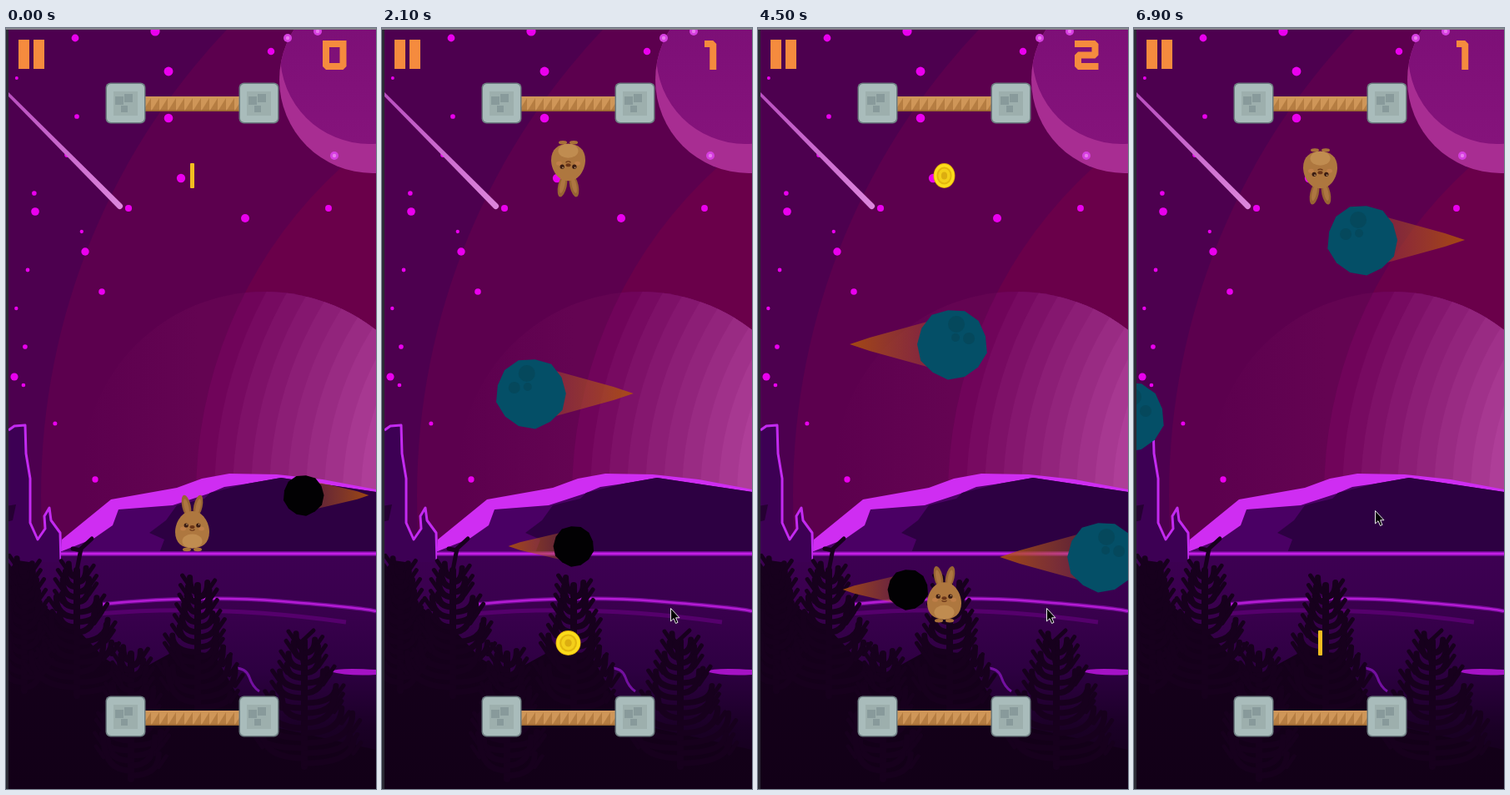
These frames come from a looping animation (444x912 px, 7 s). An HTML page with a canvas:

```html
<!DOCTYPE html>
<html lang="en">
<head>
<meta charset="utf-8">
<title>Bouncing bunny</title>
<style>
html, body { margin: 0; width: 100%; height: 100%; overflow: hidden; background: #000; }
canvas { display: block; }
</style>
</head>
<body>
<canvas id="stage" width="444" height="912" role="img" aria-label="Bunny game: GAME OVER, RESTART"></canvas>
<script>
const W = 444, H = 912, LOOP = 7000, STEP = 100;
const GAME_OVER = 4600, RESTART = 5560;
const stage = document.getElementById('stage').getContext('2d');
let g = stage;

// drawing helpers
function fill(d, color) {
  g.fillStyle = color;
  g.fill(new Path2D(d));
}
function line(d, color, width) {
  g.strokeStyle = color;
  g.lineWidth = width;
  g.stroke(new Path2D(d));
}
function ellipse(x, y, rx, ry, color, turn = 0) {
  g.fillStyle = color;
  g.beginPath();
  g.ellipse(x, y, rx, ry, turn, 0, Math.PI * 2);
  g.fill();
}
const disc = (x, y, r, color) => ellipse(x, y, r, r, color);
function rect(x, y, w, h, color) {
  g.fillStyle = color;
  g.fillRect(x, y, w, h);
}
function panel(x, y, w, h, r, color) {
  g.fillStyle = color;
  g.beginPath();
  g.roundRect(x, y, w, h, r);
  g.fill();
}
function fade(x0, y0, x1, y1, ...colors) {
  const f = g.createLinearGradient(x0, y0, x1, y1);
  colors.forEach((c, i) => f.addColorStop(i / (colors.length - 1), c));
  return f;
}
function clipped(path, paint) {
  g.save();
  g.clip(new Path2D(path));
  paint();
  g.restore();
}
const circlePath = (x, y, r) => `M${x - r} ${y} a${r} ${r} 0 1 0 ${2 * r} 0 a${r} ${r} 0 1 0 ${-2 * r} 0Z`;
const mix = (a, b, u) => a + (b - a) * u;
function seeded(seed) {
  seed *= 7919;
  return () => (seed = (seed * 16807) % 2147483647) / 2147483647;
}

// scenery
const BRIGHT_STARS = [
  [179, 4], [195, 52], [195, 108], [210, 180], [287, 228], [35, 220], [95, 268],
  [10, 418], [83, 12], [318, 28], [147, 216], [387, 216], [115, 316], [107, 541]
];
const SHADE = '#17001d';

function stars() {
  BRIGHT_STARS.forEach(([x, y], i) => disc(x, y, 5.6 - i * .15, '#ea00ee'));
  const rnd = seeded(17);
  for (let i = 0; i < 10; i++) disc(8 + 90 * rnd(), 60 + i * 46, 2 + rnd(), '#ea00ee');
}

function sky() {
  rect(0, 0, W, H, '#4d004f');
  disc(852, 560, 810, '#5c004e');
  disc(758, 560, 530, '#6a004a');
  clipped(circlePath(310, 534, 218), () => {
    rect(90, 300, W, 300, fade(92, 0, 230, 0, '#5c004e', '#640452'));
    const bands = 10;
    for (let i = 0; i < bands; i++) {
      const u = i / (bands - 1);
      disc(758, 560, 530 - 22 * i, `rgb(${mix(112, 174, u)},${mix(4, 62, u)},${mix(90, 152, u)})`);
    }
  });
  stars();

  clipped(circlePath(440, 62, 112), () => {
    rect(320, 0, 130, 180, '#a82d92');
    disc(436, 32, 107, fade(0, 0, 0, 139, '#7d0f77', '#85137b'));
  });
  for (const [x, y] of [[338, 12], [374, 4], [394, 153]]) {
    disc(x, y, 5, '#d63fe0');
    disc(x, y, 2.2, '#e87cec');
  }
  fill('M3 77 L139 211 A3 3 0 0 1 134 216 L3 82Z', fade(3, 79, 137, 213, '#b94fc0', '#dc86dc'));
}

function hills() {
  fill('M67 613 L126 565 205 551 235 540 268 534 325 535 380 541 444 553 V640 H67Z', '#cf2df2');
  fill('M67 627 L105 612 128 596 135 577 200 572 243 558 262 550 290 546 330 539 444 556 V640 H67Z', '#4a0064');
  fill('M444 556 L330 539 290 546 245 557 238 564 205 572 192 590 172 605 190 613 184 629 H444Z', '#2d0042');
  const cliff = 'M3 482 L10 477 23 476 24 510 29 540 29 593 38 613 47 600 46 585 52 575 54 590 65 605 66 640 72 660';
  fill(cliff + 'V720 H0 V482Z', '#3d0054');
  g.lineJoin = 'round';
  line(cliff, '#c32af0', 3);
}

function lake() {
  const wave = 'M110 691 Q230 679 330 687 T444 699';
  fill(`M0 640 L66 640 V629 H${W} V${H} H0Z`, fade(0, 629, 0, H, '#3d0052', '#39004d', '#2d0041', '#1a0025', '#120017'));
  rect(66, 627, W, 6, '#6c0a8e');
  rect(66, 628.5, W, 3, '#c41fe6');
  line('M110 702 Q250 690 408 712', '#55006c', 5);
  line(wave, '#6f0a90', 5);
  line(wave, '#b41bd4', 2.5);
  line('M272 767 Q288 766 292 778 T304 795', '#7310a0', 3);
  fill('M388 771 Q400 766 444 769 V775 Q410 777 388 771Z', '#a512c6');
}

// shoots leave the stem sideways and bend upward
function bush(x, top, spread) {
  const rnd = seeded(x), tall = 150;
  line(`M${x} ${top + tall} L${x} ${top}`, SHADE, 8);
  for (let d = 8; d < tall; d += 6) {
    const u = d / tall, side = d % 4 ? 1 : -1;
    const reach = side * (8 + spread * u * mix(.5, 1, rnd()));
    const rise = mix(16, 44, rnd() * u);
    const y = top + d, tipX = x + reach, tipY = y - rise;
    line(`M${x} ${y} Q${tipX} ${y} ${tipX} ${tipY}`, SHADE, 7);
    line(`M${tipX} ${tipY + rise * .6} l${side * 9} -13`, SHADE, 5);
  }
}

function foreground() {
  g.lineCap = 'round';
  fill('M0 652 L14 638 28 640 42 690 90 725 118 755 150 775 205 745 250 750 275 795 310 835 444 865 V912 H0Z',
    fade(0, 640, 0, H, SHADE, '#120017'));
  for (const [x, top, spread] of [[22, 644, 26], [85, 650, 52], [150, 750, 40], [230, 668, 42], [358, 735, 62]]) bush(x, top, spread);
  line('M84 655 L90 624 103 612 M80 624 L90 626 M356 760 L353 737 369 722 M348 731 L354 737', SHADE, 5);
  fill('M0 573 L12 571 8 590 0 592Z', '#260033');
  g.lineCap = 'butt';
}

function block(x, y) {
  panel(x - .5, y - .5, 48, 49, 6, '#6c7c80');
  panel(x + 1, y + 1, 45, 46, 5, '#a9bcbb');
  rect(x + 9, y + 10, 29, 29, '#9dafad');
  for (const [dx, dy, s] of [[11, 16, 10], [22, 13, 10], [18, 27, 8]]) rect(x + dx, y + dy, s, s, '#889a9b');
}

function trampoline(y, ropeY) {
  clipped(`M167 ${ropeY} h114 v18 h-114Z`, () => {
    rect(167, ropeY, 114, 18, '#cf9658');
    for (let x = 164; x < 284; x += 10) fill(`M${x} ${ropeY + 18} l10 -16 v16Z`, '#b57d42');
    rect(167, ropeY + 16.5, 114, 1.5, '#98652f');
  });
  block(120, y);
  block(280, y);
}

function scenery() {
  const sheet = document.createElement('canvas');
  sheet.width = W;
  sheet.height = H;
  g = sheet.getContext('2d');
  sky();
  hills();
  lake();
  foreground();
  trampoline(66, 82);
  trampoline(801, 818);
  for (const x of [15, 33]) rect(x, 14, 13, 35, '#f58b3e');
  g = stage;
  return sheet;
}

// block lettering: strokes on a grid 2 wide and 4 high
const GLYPHS = {
  G: '20 00 04 24 22 12', A: '04 00 20 24/02 22', M: '04 00 20 24/10 14',
  E: '20 00 04 24/02 22', O: '00 20 24 04 00 20', V: '00 04 24 20',
  R: '04 00 20 22 02/12 24', S: '20 00 02 22 24 04', T: '00 20/10 14',
  0: '00 20 24 04 00 20', 1: '00 20 24', 2: '00 20 22 02 04 24'
};
function glyph(ch, x, y, w, h, s) {
  const point = p => `${x + s / 2 + p[0] / 2 * (w - s)} ${y + s / 2 + p[1] / 4 * (h - s)}`;
  const d = GLYPHS[ch].split('/').map(part => 'M' + part.split(' ').map(point).join('L')).join('');
  g.stroke(new Path2D(d));
}
function lettering(text, x, y, w, h, s, gap, color) {
  g.strokeStyle = color;
  g.lineWidth = s;
  g.lineCap = 'square';
  g.lineJoin = 'bevel';
  for (const ch of text) {
    const cw = ch === 'M' ? w * 1.26 : ch === '1' ? w / 2 : w;
    glyph(ch, x, y, cw, h, s);
    x += cw + gap;
  }
  g.lineCap = 'butt';
}

// sprites
function bunny(feet, pull) {
  g.save();
  g.translate(223.5, feet);
  g.scale(1, pull);
  for (const s of [-1, 1]) {
    ellipse(s * 7, -54, 5.2, 13.5, '#986433', s * .22);
    ellipse(s * 7, -53, 2.8, 10, '#ad7641', s * .22);
    ellipse(s * 6.5, -2, 5, 2.2, '#a87039');
  }
  fill('M0 -48 C13 -48 20.5 -34 20.5 -23 C20.5 -10 12 -3.5 0 -3.5 C-12 -3.5 -20.5 -10 -20.5 -23 C-20.5 -34 -13 -48 0 -48Z', '#ae773f');
  ellipse(0, -12, 12, 8.5, '#c08c50');
  for (const s of [-1, 1]) {
    ellipse(s * 11, -27, 3.5, 2.5, '#bf7f49');
    disc(s * 7.3, -31, 2.6, '#3a1c12');
    disc(s * 7.3 + .8, -32, .8, '#d8b080');
  }
  ellipse(0, -29, 3, 2, '#6a3518');
  line('M-3 -26 Q0 -23.5 3 -26', '#6a3518', 1.2);
  g.restore();
}

const ROCK = 'M' + Array.from({ length: 13 }, (_, i) => {
  const a = i / 13 * Math.PI * 2, r = 42 + Math.sin(i * 2.4);
  return `${r * Math.cos(a)} ${r * Math.sin(a)}`;
}).join('L') + 'Z';
function asteroid(x, y, dir, big) {
  const tip = big ? 123 : 135, k = big ? 1 : .58;
  g.save();
  g.translate(x, y);
  g.scale(-dir * k, k);
  fill(`M30 -27 L${tip - 24} -8 ${tip} 0 ${tip - 24} 8 30 27Z`,
    fade(30, 0, tip, 0, 'rgba(180,90,35,.4)', 'rgba(176,86,24,.62)', 'rgba(176,84,8,.85)'));
  fill(ROCK, big ? '#044f67' : '#020103');
  if (big) {
    for (const [sx, sy, r] of [[-5, -24, 10], [-20, -7, 7], [-4, -8, 5]]) disc(sx, sy, r, '#05485c');
  }
  g.restore();
}

// six poses per half turn, starting edge-on
function coin(y, ms) {
  const pose = Math.round(ms / 591 * 6) % 6;
  const r = Math.max(2.5, 15 * Math.sin(pose * Math.PI / 6));
  if (pose === 0) return panel(221, y - 15, 5, 30, 1, '#f2bd20');
  ellipse(223.5, y, r, 15, '#e0a808');
  ellipse(223.5, y, r - .8, 14, '#fbdc1c');
  ellipse(223.5, y, r * .7, 10.5, '#e3b60e');
  ellipse(223.5, y, r * .55, 8.5, '#f3cf1a');
  ellipse(223.5, y, r * .28, 4.5, '#dcae10');
}

// game rules
const GRAVITY = 2200, BOUNCE = .515, TALL = 68;
const CEILING = 100, FLOOR = 817, COIN_TOP = 177, COIN_BOTTOM = 737;
const CLICKS = [501, 3090, 6243];
const newGame = (feet, speed, spin) => ({ feet, speed, spin, pull: 1, coinY: COIN_TOP, score: 0 });

function advance(s, t) {
  if (CLICKS.includes(t)) {
    s.pull = -s.pull;
    s.feet += s.pull * TALL;
  }
  s.speed += s.pull * GRAVITY / 1000;
  s.feet += s.speed / 1000;
  const ground = s.pull > 0 ? FLOOR : CEILING;
  if ((s.feet - ground) * s.pull > 0) {
    s.feet = ground;
    s.speed *= -BOUNCE;
  }
  const middle = s.feet - s.pull * TALL / 2;
  if (Math.abs(middle - s.coinY) < TALL / 2 + 15) {
    s.score++;
    s.coinY = COIN_TOP + COIN_BOTTOM - s.coinY;
  }
}

// the game state at every step of the loop
function play() {
  const track = [];
  let s = newGame(627, 867, 0);
  for (let t = 0; t < LOOP; t++) {
    if (t === RESTART) s = newGame(490, 0, 5127);
    if (t % STEP === 0) track.push({ ...s });
    if (t < GAME_OVER || t >= RESTART) advance(s, t);
  }
  return track;
}

// [time of entry, y, speed px/s]; the fast ones are small
const ROCKS = [
  [-353, 560, -365], [630, 438, -209], [1355, 621, 365], [2322, 634, 209], [3184, 379, 209],
  [3892, 673, 365], [4863, 565, -365], [5886, 254, -209], [6728, 466, 209]
];
function drawRocks(t) {
  for (const [enter, y, speed] of ROCKS) {
    if (t < enter || (enter > RESTART) !== (t >= RESTART)) continue;
    const edge = speed > 0 ? -42 : W + 42;
    asteroid(edge + speed * (t - enter) / 1000, y, Math.sign(speed), Math.abs(speed) < 300);
  }
}

function ease(t, from, span) {
  const u = Math.min(1, Math.max(0, (t - from) / span));
  return u * u * (3 - 2 * u);
}
function drawPointer(t) {
  if (t < 400) return;
  const a = ease(t, 4700, 400), b = ease(t, RESTART, 400);
  g.save();
  g.translate(346 - 27 * a - 30 * b, 695 - 84 * a - 33 * b);
  const arrow = 'M.5 .5 V16 L4 12.7 6.5 18.5 9 17.4 6.6 11.8 H11Z';
  fill(arrow, '#000');
  g.lineJoin = 'miter';
  line(arrow, '#e8e8e8', 1);
  g.restore();
}

function gameOver() {
  rect(0, 0, W, H, 'rgba(0,0,3,.88)');
  const warm = fade(0, 104, 0, 144, '#f58c2c', '#fba02a', '#f5922a');
  lettering('GAME', 38, 104, 31, 40, 8, 13, warm);
  lettering('OVER', 235, 104, 31, 40, 8, 13, warm);
  panel(80, 571, 287, 66, 5, '#a8481a');
  panel(81.5, 572.5, 284, 62, 4, '#f08a48');
  panel(83, 574, 281, 59, 4, fade(0, 574, 0, 633, '#e87430', '#e0621c'));
  rect(85, 627, 277, 2, '#ee8544');
  rect(83, 629, 281, 5, '#d65a1a');
  lettering('RESTART', 125, 587, 21, 28, 5.5, 7, '#fff');
}

const backdrop = scenery();
const track = play();

function draw(t) {
  const over = t >= GAME_OVER && t < RESTART;
  const { feet, pull, coinY, score, spin } = track[Math.floor(t / STEP)];
  g.drawImage(backdrop, 0, 0);
  coin(coinY, t - spin);
  drawRocks(t);
  if (!over) bunny(feet, pull);
  lettering(String(score), score === 1 ? 387 : 380, 15, 28.5, 35, 8, 0, '#f58b3e');
  if (over) gameOver();
  rect(0, 0, 3, H, '#2b2b35');
  rect(0, 0, W, 2, '#85858c');
  drawPointer(t);
}

const begin = performance.now();
function tick() {
  const t = (performance.now() - begin) % LOOP;
  draw(Math.floor(t / STEP) * STEP);
  requestAnimationFrame(tick);
}
tick();
</script>
</body>
</html>
```
